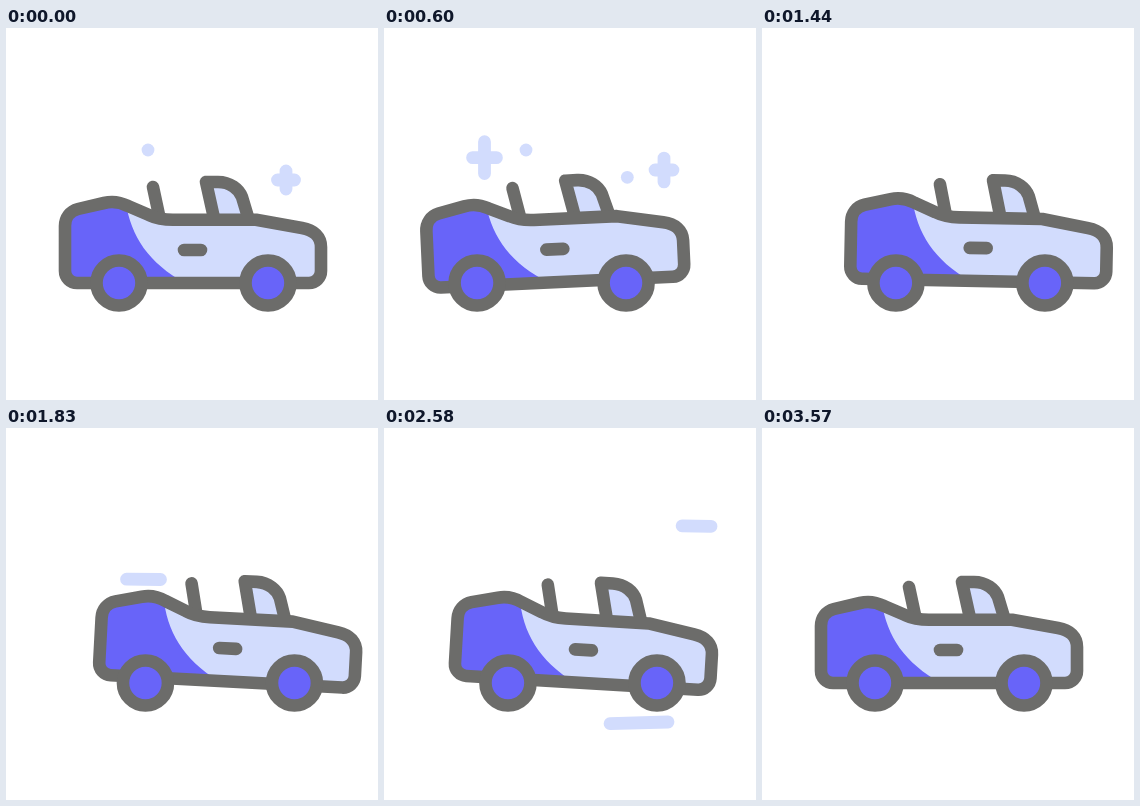
These frames come from a looping animation (372 by 372 pixels, 3600 ms). An HTML page:

```html
<!DOCTYPE html>
<html lang="en">
<head>
<meta charset="utf-8">
<title>Convertible</title>
<style>
  html, body { margin: 0; width: 100%; height: 100%; overflow: hidden; background: #fff; }
  svg { display: block; width: 100vw; height: 100vh; }
  .line { fill: none; stroke: #6c6c6a; stroke-width: 12.6; stroke-linecap: round; stroke-linejoin: round; }
  .pale { fill: #d2dcfd; }
  .deep { fill: #6864f9; }
  .glow { fill: none; stroke: #d2dcfd; stroke-width: 12.8; stroke-linecap: round; }
</style>
</head>
<body>
<svg viewBox="0 0 372 372">
  <defs>
    <path id="shell" d="M71 255A12 12 0 0 1 59 243V198C59 190 64 183 72 181L98 175C108 172.5 115 174.5 122 178L143 187Q153 191.8 167 191.8H250L296 200C308 202 315 209 315 219V243A12 12 0 0 1 303 255Z"/>
    <clipPath id="inside"><use href="#shell"/></clipPath>
  </defs>
  <g id="air"></g>
  <g id="body">
    <path class="line" d="M147 159L153 187"/>
    <path class="line pale" d="M208 190L200 154H212C224 154 233 161 236 169L242 189"/>
    <use href="#shell" class="pale"/>
    <path class="deep" clip-path="url(#inside)" d="M50 160H119V168C123 206 141 234 179 255V262H50Z"/>
    <use href="#shell" class="line"/>
    <path class="line" d="M178 222H195"/>
  </g>
  <g id="wheels">
    <circle class="line deep" cx="113" cy="255" r="22.5"/>
    <circle class="line deep" cx="262" cy="255" r="22.5"/>
  </g>
</svg>
<script>
const LOOP = 3600;
const byId = id => document.getElementById(id);
const clamp = v => Math.max(0, Math.min(1, v));

// Smooth curve through [time, value] keys, flat at every turning point.
function curve(...keys) {
  const last = keys.length - 1;
  const slope = i => (keys[i + 1][1] - keys[i][1]) / (keys[i + 1][0] - keys[i][0]);
  const tangent = keys.map((k, i) => {
    if (i === 0 || i === last) return 0;
    const a = slope(i - 1), b = slope(i);
    return a * b <= 0 ? 0 : 2 * a * b / (a + b);
  });
  return t => {
    let i = 0;
    while (i < last - 1 && t >= keys[i + 1][0]) i++;
    const [t0, v0] = keys[i], [t1, v1] = keys[i + 1];
    const h = t1 - t0, u = clamp((t - t0) / h), w = 1 - u;
    return v0 * (1 + 2 * u) * w * w + v1 * u * u * (3 - 2 * u)
      + h * u * w * (tangent[i] * w - tangent[i + 1] * u);
  };
}

// Back up, dash forward, roll back and settle.
const bodyX = curve([0, 0], [500, -16.7], [1700, 36], [2580, 13], [3120, -7.8], [3570, 0]);
const wheelX = curve([0, 0], [550, -20.2], [1700, 27], [2580, 11], [3110, -11.5], [3570, 0]);
const tilt = curve([0, 0], [520, -2.7], [2150, 3.7], [2580, 3.4], [3250, 0]);
const lift = t => -2 * Math.sin(Math.PI * clamp(t / 2800)) ** 2;

// Sparkle arms over one life: burst open, then shrink.
const tall = curve([0, 9], [0.22, 16], [0.71, 12], [1, 6]);
const wide = curve([0, 8.5], [0.22, 12], [0.71, 9], [1, 4]);

// A glowing stroke; shape(p) gives its path for p from 0 to 1 within its life.
function glow(from, life, shape) {
  const el = document.createElementNS('http://www.w3.org/2000/svg', 'path');
  el.setAttribute('class', 'glow');
  byId('air').append(el);
  return t => {
    const p = (t - from) / life;
    el.setAttribute('d', p >= 0 && p < 1 ? shape(p) : '');
  };
}

const SPARKLE = 840;

const dot = (x, y, from) => glow(from, SPARKLE, () => `M${x} ${y}h.01`);

const plus = (x, y, rise, from) => glow(from, SPARKLE, p => {
  const cy = y - rise * p, v = tall(p), h = wide(p);
  return `M${x} ${cy - v}v${2 * v}M${x - h} ${cy}h${2 * h}`;
});

// The tip runs ahead and the tail follows after a delay.
const streak = (x0, y0, x1, y1, from, life, delay) => glow(from, life, p => {
  const at = k => `${x0 + (x1 - x0) * k} ${y0 + (y1 - y0) * k}`;
  const tail = clamp((p - delay) / (1 - delay)) ** 1.3;
  const tip = clamp(p / 0.93) + 0.0001;
  return `M${at(tail)}L${at(tip)}`;
});

const effects = [
  dot(142, 122, 0),
  dot(243.3, 149.3, 360),
  plus(280, 152, 14, 0),
  plus(100.5, 136.8, 25, 360),
  streak(154.5, 151.5, 33, 150.5, 1670, 620, 0.4),
  streak(284, 294, 174, 297, 2140, 900, 0.5),
  streak(327, 98.3, 190, 96, 2430, 770, 0.32)
];

function draw(t) {
  byId('body').setAttribute('transform',
    `translate(${bodyX(t)} ${lift(t)}) rotate(${tilt(t)} 187 222)`);
  byId('wheels').setAttribute('transform', `translate(${wheelX(t)} 0)`);
  effects.forEach(show => show(t));
}

const start = performance.now();
function tick() {
  draw((performance.now() - start) % LOOP);
  requestAnimationFrame(tick);
}
tick();
</script>
</body>
</html>
```
